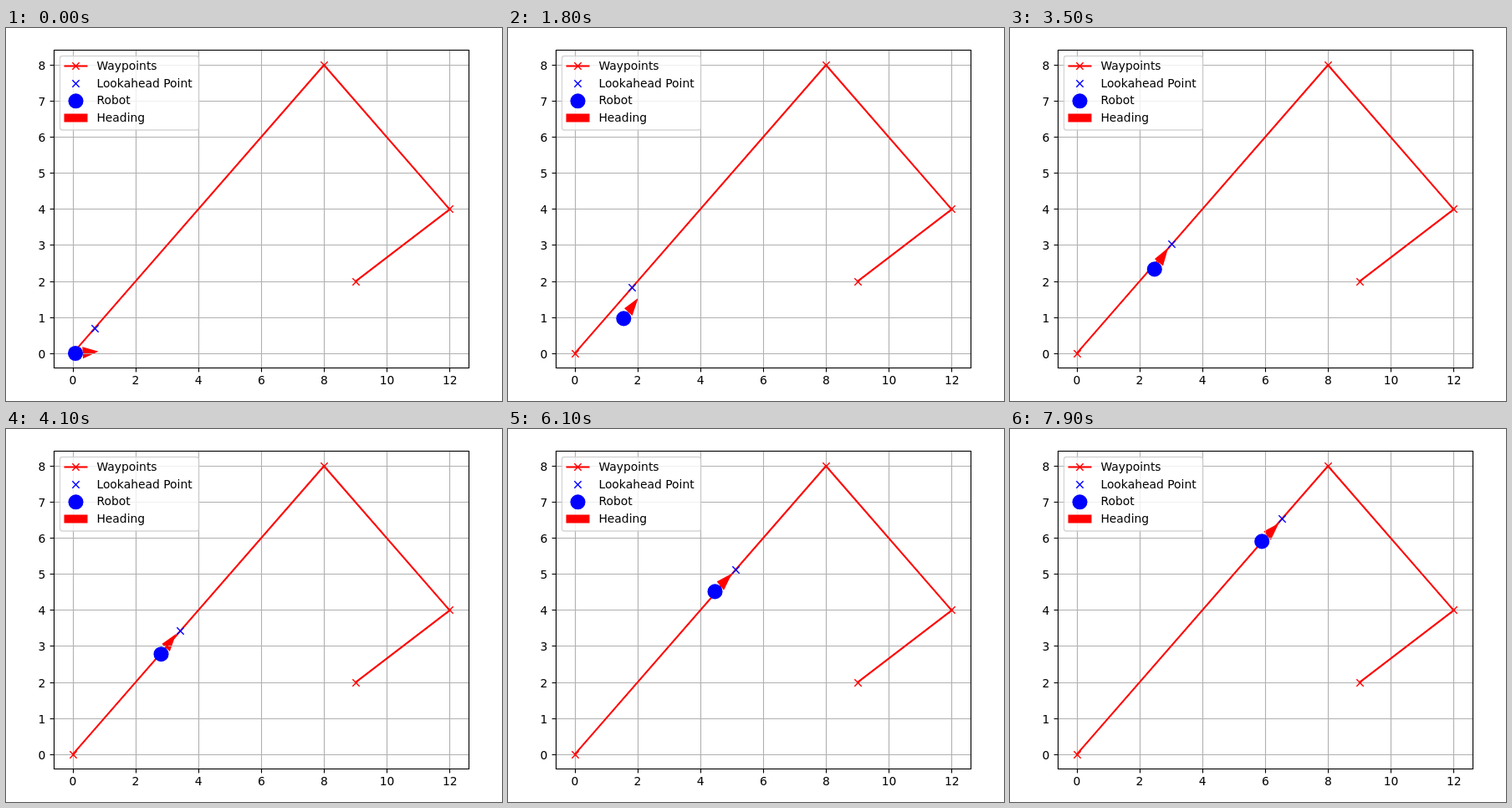
These frames come from a looping animation (593 px wide and 446 px high, 8 s). An HTML page with a canvas:

```html
<!DOCTYPE html>
<html>
<head>
<meta charset="utf-8">
<style>
html, body { margin: 0; height: 100%; overflow: hidden; background: #fff; }
canvas { display: block; }
</style>
</head>
<body>
<canvas id="c" width="593" height="446"></canvas>
<script>
const g = document.getElementById('c').getContext('2d');
const PT = 100 / 72, LOOP = 8000, STEP = 100, RADIUS = 1;
const SX = 37.576, SY = 43.137;
const px = x => 79.545 + SX * x, py = y => 389.4 - SY * y;
const snapX = x => Math.round(px(x)) + 0.5;
const snapY = y => Math.floor(py(y)) + 0.5;
const waypoints = [[0, 0], [8, 8], [12, 4], [9, 2]];

// time in steps, robot x and y in pixels, heading in degrees
const keys = [
  [3, 83, 389, 4], [7, 99.5, 385, 18], [11, 115, 375, 38],
  [15, 129, 360, 47], [18, 138.3, 347.4, 51], [20, 142.8, 339.8, 53],
  [26, 155.5, 318.5, 55], [30, 163, 304, 55], [32, 166.8, 296.8, 55],
  [37, 176.8, 282.8, 53], [41, 185.5, 269.2, 50], [45, 197.8, 252.8, 48],
  [50, 212.8, 232.8, 45], [53, 223.3, 221.5, 43], [55, 228.8, 214.8, 43],
  [61, 247.5, 194.4, 43], [63, 255.8, 184.8, 43], [73, 288.8, 148.8, 43],
  [74, 290.8, 145.8, 43], [79, 301.2, 134.4, 43]
];
// steps at which the plot is not refreshed
const holds = new Set([12, 16, 21, 27, 31, 33, 34, 38, 42, 46, 51, 56, 64, 75, 76]);

function pose(step) {
  while (holds.has(step)) step--;
  step = Math.max(step, keys[0][0]);
  const i = Math.max(1, keys.findIndex(k => k[0] >= step));
  const a = keys[i - 1], b = keys[i];
  const f = (step - a[0]) / (b[0] - a[0]);
  return [1, 2, 3].map(j => a[j] + (b[j] - a[j]) * f);
}

function stroke(points, color, width) {
  g.strokeStyle = color;
  g.lineWidth = width;
  g.beginPath();
  points.forEach(p => g.lineTo(...p));
  g.stroke();
}

function cross(x, y, color) {
  const r = 3 * PT;
  stroke([[x - r, y - r], [x + r, y + r]], color, PT);
  stroke([[x - r, y + r], [x + r, y - r]], color, PT);
}

function disc(x, y) {
  g.fillStyle = '#00f';
  g.beginPath();
  g.arc(x, y, 6.5 * PT, 0, 7);
  g.fill();
}

function text(s, x, y, align) {
  g.fillStyle = '#000';
  g.textAlign = align;
  g.fillText(s, x, y);
}

// The head is built in data units, so it shears with the axes.
function arrow(x, y, angle) {
  const c = Math.cos(angle), s = Math.sin(angle);
  const at = (u, v) => [x + SX * (u * c - v * s), y - SY * (u * s + v * c)];
  const head = [at(0.25, 0.14), at(0.68, 0), at(0.25, -0.14)];
  g.fillStyle = g.strokeStyle = '#f00';
  g.lineWidth = PT;
  g.beginPath();
  head.forEach(p => g.lineTo(...p));
  g.closePath();
  g.fill();
  g.stroke();
  stroke([[x, y], at(0.3, 0)], '#f00', PT);
}

function lookahead(x, y, angle) {
  const u = (x - px(0)) / SX - 0.1 * Math.cos(angle);
  const v = (py(0) - y) / SY - 0.1 * Math.sin(angle);
  return (u + v) / 2 + Math.sqrt((RADIUS ** 2 - (u - v) ** 2 / 2) / 2);
}

function axes() {
  const line = (a, b) => stroke([a, b], '#b0b0b0', 1.11);
  for (let x = 0; x <= 12; x += 2) line([snapX(x), 26], [snapX(x), 406]);
  for (let y = 0; y <= 8; y++) line([57, snapY(y)], [553, snapY(y)]);
}

function frame() {
  for (let x = 0; x <= 12; x += 2) {
    stroke([[snapX(x), 406.5], [snapX(x), 411.4]], '#000', 1.11);
    text(x, px(x) + 0.3, 426.3, 'center');
  }
  for (let y = 0; y <= 8; y++) {
    stroke([[57.5, snapY(y)], [52.6, snapY(y)]], '#000', 1.11);
    text(y, 47.3, snapY(y) + 5, 'right');
  }
  g.strokeStyle = '#000';
  g.lineWidth = 1.11;
  g.strokeRect(57.5, 26.5, 496, 380);
}

function legend() {
  g.fillStyle = 'rgba(255,255,255,.8)';
  g.strokeStyle = 'rgba(204,204,204,.8)';
  g.lineWidth = PT;
  g.beginPath();
  g.roundRect(64.5, 33.5, 166, 88.5, 2.8);
  g.fill();
  g.stroke();
  stroke([[69.5, 45.5], [97.5, 45.5]], '#f00', 1.5 * PT);
  cross(83.5, 45.5, '#f00');
  cross(83.5, 66.5, '#00f');
  disc(83.5, 87.3);
  g.fillStyle = '#f00';
  g.fillRect(69.5, 102.5, 28, 10);
  ['Waypoints', 'Lookahead Point', 'Robot', 'Heading'].forEach(
    (s, i) => text(s, 108.4, 50.2 + 20.6 * i, 'left'));
}

function draw(now) {
  const [x, y, deg] = pose(Math.floor(now % LOOP / STEP));
  const angle = deg * Math.PI / 180;
  g.fillStyle = '#fff';
  g.fillRect(0, 0, 593, 446);
  g.font = '13.89px "DejaVu Sans", sans-serif';
  arrow(x, y, angle);
  axes();
  const path = waypoints.map(([a, b]) => [px(a), py(b)]);
  g.lineJoin = 'round';
  stroke(path, '#f00', 1.5 * PT);
  g.lineJoin = 'miter';
  path.forEach(p => cross(Math.floor(p[0] + 0.5) + 0.5, Math.floor(p[1]) + 0.5, '#f00'));
  const target = lookahead(x, y, angle);
  cross(Math.floor(px(target)) + 0.5, Math.floor(py(target)) + 0.5, '#00f');
  disc(x, y);
  frame();
  legend();
}

let start;
function tick(now) {
  start ??= now;
  draw(now - start);
  requestAnimationFrame(tick);
}
draw(0);
requestAnimationFrame(tick);
</script>
</body>
</html>
```
